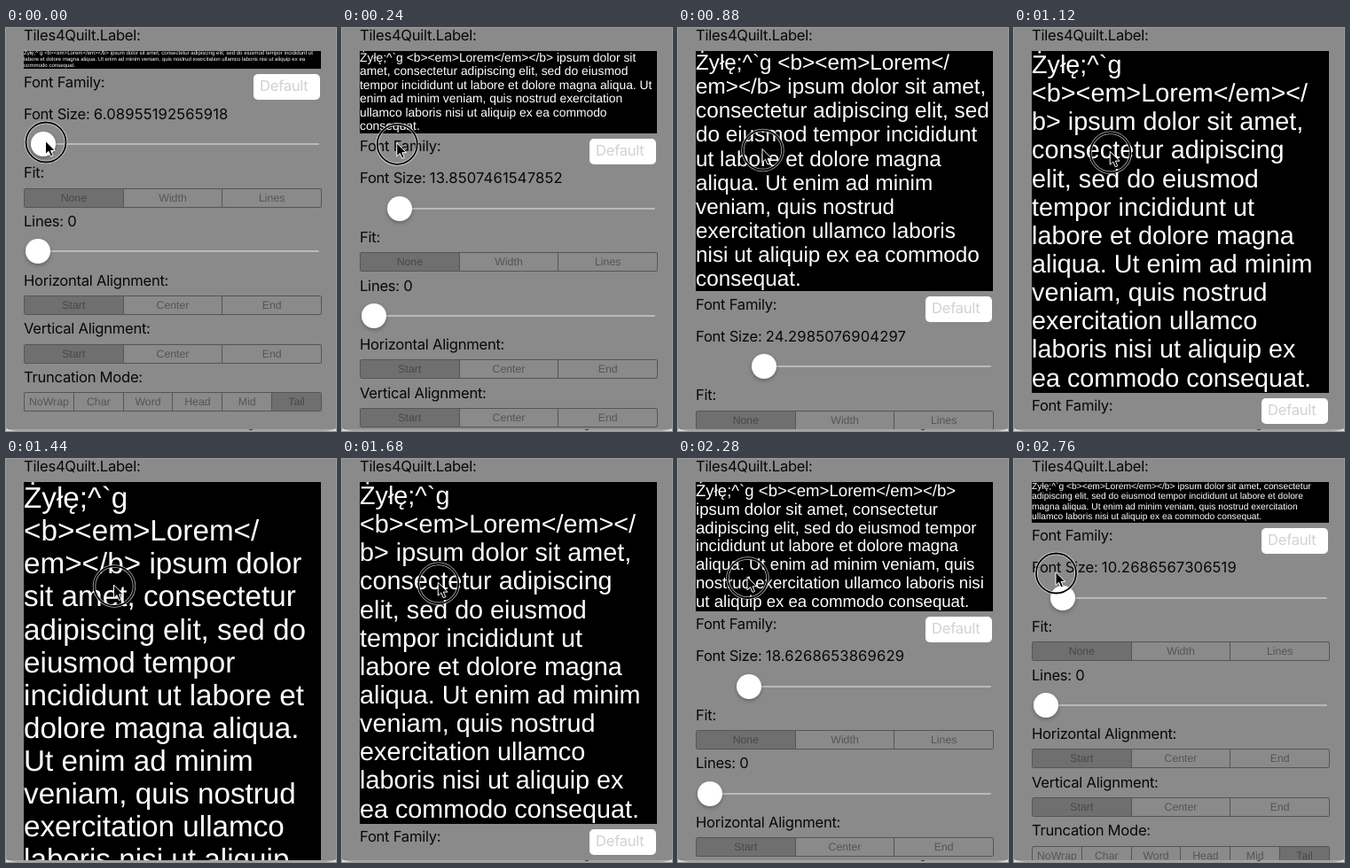
An HTML page that plays this animation: 372 px wide and 455 px high, repeating every 2.8 s.

```html
<!DOCTYPE html>
<html lang="en">
<head>
<meta charset="utf-8">
<title>Label settings</title>
<style>
html, body { margin: 0; width: 100%; height: 100%; overflow: hidden; background: #8a8a8a; }
#stage {
  position: relative; width: 372px; height: 455px; overflow: hidden; background: #8a8a8a;
  font: 16.6px/20px Inter, Roboto, sans-serif; letter-spacing: -.26px; color: #080808;
  text-rendering: geometricPrecision; white-space: nowrap;
}
.title { position: absolute; left: 20px; top: -1px; }
#label {
  position: absolute; left: 20px; top: 26px; width: 335px; background: #000; color: #fff;
  font-family: "Liberation Sans", Arial, sans-serif; line-height: 1.117; letter-spacing: 0;
  white-space: normal;
}
#label span { white-space: nowrap; }
#form { position: absolute; left: 0; top: 0; width: 372px; }
#form > * { position: absolute; }
.text { left: 20px; }
#size { letter-spacing: .15px; }
.button {
  left: 279px; top: 7px; width: 68px; height: 29px; padding-left: 7px; border-radius: 5px;
  background: #fff; color: #d2d2d2; line-height: 28px;
}
.slider { --x: 35.5px; left: 0; width: 353px; height: 2px; }
.slider::before {
  content: ""; position: absolute; left: var(--x); right: 0; height: 2px;
  background: #b9b9b9; border-radius: 1px;
}
.slider::after {
  content: ""; position: absolute; left: calc(var(--x) - 14px); top: -13px;
  width: 28px; height: 28px; border-radius: 50%; background: #fff;
  box-shadow: 0 2px 4px rgba(0, 0, 0, .28);
}
.segments {
  left: 20px; width: 336px; height: 22px; box-sizing: border-box; display: flex;
  border: 1px solid #555; border-radius: 2px;
  font: 12.3px/20px "Liberation Sans", Arial, sans-serif; letter-spacing: 0; color: #555;
}
.segments span { flex: 1 1 0; text-align: center; }
.segments span + span { border-left: 1px solid #555; }
.segments .on { background: #6f6f6f; color: #484848; }
#pointer { position: absolute; left: -30px; top: -30px; }
#edge { position: absolute; left: 0; top: 449px; }
</style>
</head>
<body>
<div id="stage">
  <div class="title">Tiles4Quilt.Label:</div>
  <div id="label">Żyłę;^`g <span>&lt;b&gt;&lt;em&gt;Lorem&lt;/</span><wbr><span>em&gt;&lt;/</span><wbr><span>b&gt;</span> ipsum dolor sit amet, consectetur adipiscing elit, sed do eiusmod tempor incididunt ut labore et dolore magna aliqua. Ut enim ad minim veniam, quis nostrud exercitation ullamco laboris nisi ut aliquip ex ea commodo consequat.</div>
  <div id="form">
    <div class="text" style="top:6.6px">Font Family:</div>
    <div class="button">Default</div>
    <div class="text" style="top:42.6px">Font Size: <span id="size"></span></div>
    <div class="slider" id="slider" style="top:85px"></div>
    <div class="text" style="top:109px">Fit:</div>
    <div class="segments" style="top:135.4px"><span class="on">None</span><span>Width</span><span>Lines</span></div>
    <div class="text" style="top:163.8px">Lines: 0</div>
    <div class="slider" style="top:206px"></div>
    <div class="text" style="top:230.4px">Horizontal Alignment:</div>
    <div class="segments" style="top:256.6px"><span class="on">Start</span><span>Center</span><span>End</span></div>
    <div class="text" style="top:284.8px">Vertical Alignment:</div>
    <div class="segments" style="top:311.2px"><span class="on">Start</span><span>Center</span><span>End</span></div>
    <div class="text" style="top:339.2px">Truncation Mode:</div>
    <div class="segments" style="top:365.8px"><span>NoWrap</span><span>Char</span><span>Word</span><span>Head</span><span>Mid</span><span class="on">Tail</span></div>
  </div>
  <svg id="edge" width="372" height="6">
    <path d="M0 4H372V6H0Z" fill="#a4a4a4"/>
    <path d="M0 3Q4 5 12 6H0ZM372 3Q368 5 360 6H372Z" fill="#dcdcdc"/>
    <path d="M274 4.5H278" stroke="#444"/>
  </svg>
  <svg id="pointer" width="60" height="60" viewBox="-30 -30 60 60">
    <circle r="22.5" fill="none" stroke="#fff" stroke-opacity=".7" stroke-width="3.4"/>
    <circle r="22.5" fill="none" stroke="#000" stroke-width="1.8"/>
    <path d="M-.5-1.5V13.5L3 10.3L5.5 16L8 15L5.6 9.4H10.2Z" fill="#000" stroke="#fff"/>
  </svg>
</div>
<script>
const $ = id => document.getElementById(id);
const label = $('label'), form = $('form'), size = $('size'), slider = $('slider'), pointer = $('pointer');
const STEP = 40, COUNT = 70;

// Points are [step, value]; straight lines between them.
const dragPath = [[0, 7], [1, 21], [13, 49], [22, 68], [34, 98], [35, 100]];
const xPath = [[0, 45], [1, 47.5], [2, 53], [13, 78.5], [22, 95.5], [34, 122], [35, 124]];
const yPath = [[0, 129], [1, 129], [13, 134.5], [22, 138], [34, 143.5], [35, 144]];

function at(path, s) {
  const i = Math.max(1, path.findIndex(p => p[0] >= s));
  const [a, u] = path[i - 1], [b, v] = path[i];
  return u + (v - u) * (s - a) / (b - a);
}

let last = -1;
function draw(now) {
  const step = Math.floor(now / STEP) % COUNT;
  if (step !== last) {
    last = step;
    const s = Math.min(step, COUNT - step);
    const drag = Math.round(at(dragPath, s));
    // Single-precision sum, as the readout shows.
    const value = Math.fround(4 + Math.fround(100 * drag / 335));
    size.textContent = Number(value.toPrecision(15));
    label.style.fontSize = value + 'px';
    form.style.top = 25 + label.getBoundingClientRect().height + 'px';
    slider.style.setProperty('--x', 35.5 + drag * 304 / 335 + 'px');
    pointer.style.transform = `translate(${at(xPath, s)}px, ${at(yPath, s)}px)`;
  }
}

const start = performance.now();
function tick() {
  draw(performance.now() - start);
  requestAnimationFrame(tick);
}
tick();
</script>
</body>
</html>
```
